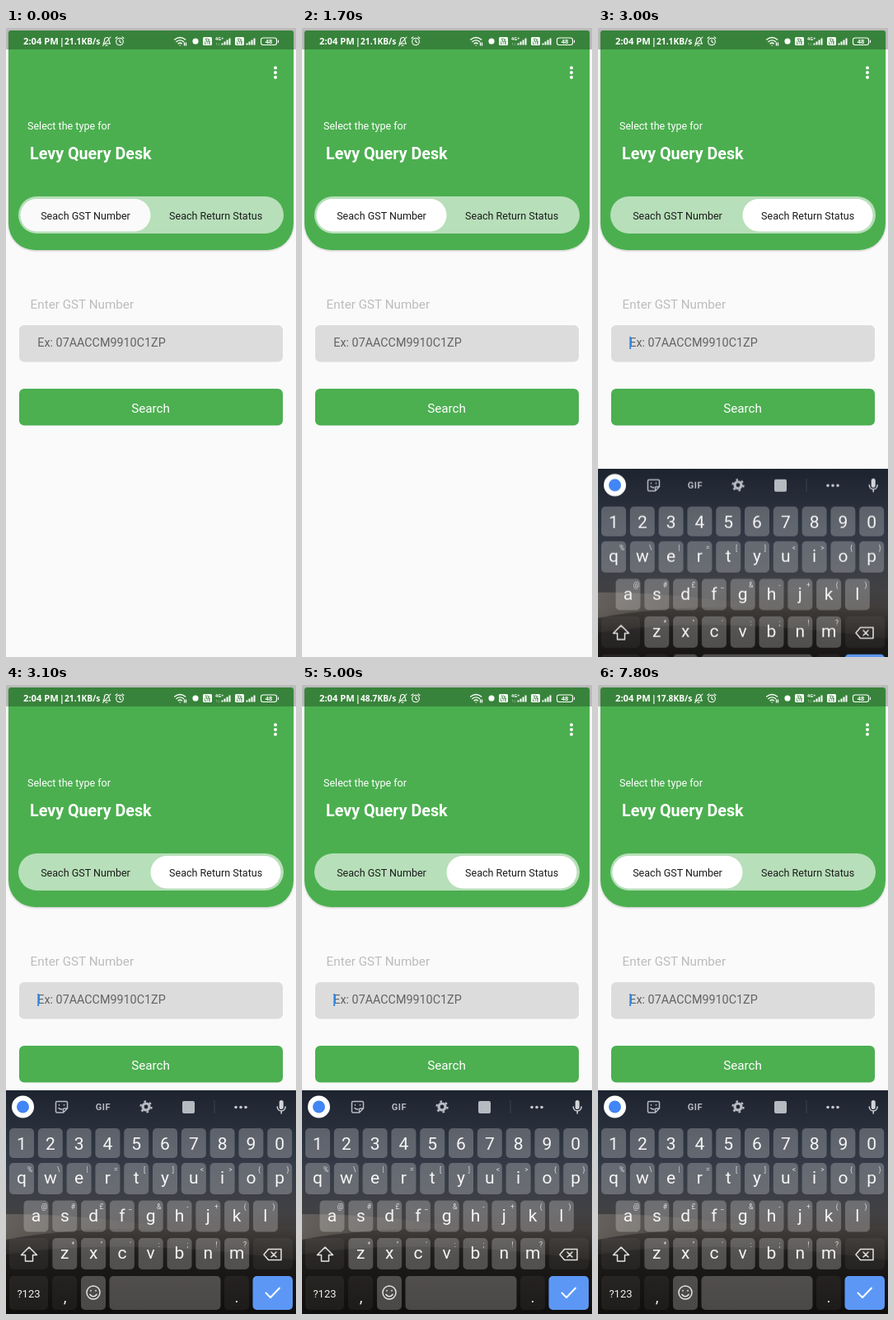
Write an HTML page that moves like this. It is 352 px wide and 762 px high and loops after 8 s.

```html
<!DOCTYPE html>
<html lang="en">
<head>
<meta charset="utf-8">
<title>Search form</title>
<style>
  html, body { margin: 0; width: 100%; height: 100%; overflow: hidden; background: #fafafa; }
  svg { display: block; width: 352px; height: 762px; font-family: Roboto, sans-serif; }
  .mid { text-anchor: middle; }
  .status { font-family: "Noto Sans", sans-serif; font-weight: 600; fill: #fff; }
  .line { fill: none; stroke-linecap: round; stroke-linejoin: round; }

  .pill, .board, .caret, .speed { animation: 8s linear infinite; }
  .pill { animation-name: slide, whiten; animation-timing-function: ease, step-end; }
  .board { animation-name: rise; }
  .caret { animation-name: blink; animation-timing-function: step-end; }
  .speed { animation-timing-function: step-end; opacity: 0; }
  .s1 { animation-name: first; }
  .s2 { animation-name: second; }
  .s3 { animation-name: third; }

  @keyframes slide {
    0%, 13.1%, 21.25%, 24.5%, 52.5%, 54.4%, 66.25%, 100% { transform: none; }
    16.25%, 18.1%, 28.2%, 49.5%, 57.5%, 63.3% { transform: translateX(158px); }
  }
  @keyframes whiten { 0% { fill: #fafafa; } 13.75%, 100% { fill: #fff; } }
  @keyframes rise {
    0%, 36.25% { transform: translateY(272px); animation-timing-function: cubic-bezier(0, 0, .2, 1); }
    38.75%, 100% { transform: none; }
  }
  @keyframes blink {
    0%, 42.5%, 53.75%, 66.25%, 78.75%, 90% { opacity: 0; }
    36.25%, 47.5%, 60%, 72.5%, 83.75%, 96.25% { opacity: 1; }
  }
  @keyframes first { 0% { opacity: 1; } 47.5%, 100% { opacity: 0; } }
  @keyframes second { 0%, 96.25% { opacity: 0; } 47.5% { opacity: 1; } }
  @keyframes third { 0% { opacity: 0; } 96.25%, 100% { opacity: 1; } }
</style>
</head>
<body>
<svg viewBox="0 0 352 762">
  <defs>
    <linearGradient id="dusk" x2="0" y2="1">
      <stop offset="0" stop-color="#1d2430"/>
      <stop offset=".34" stop-color="#343b47"/>
      <stop offset=".54" stop-color="#414144"/>
      <stop offset=".62" stop-color="#403d3b"/>
      <stop offset=".74" stop-color="#272422"/>
      <stop offset="1" stop-color="#151310"/>
    </linearGradient>
    <linearGradient id="road">
      <stop offset="0" stop-color="#8b837b" stop-opacity=".5"/>
      <stop offset="1" stop-color="#5a5451" stop-opacity="0"/>
    </linearGradient>
    <filter id="soft" x="-5%" y="-5%" width="110%" height="112%">
      <feDropShadow dx="0" dy="1" stdDeviation=".8" flood-opacity=".22"/>
    </filter>
  </defs>

  <rect width="352" height="762" fill="#fafafa"/>
  <path d="M3 6a3 3 0 0 1 3-3H346a3 3 0 0 1 3 3V237a32 32 0 0 1-32 32H35a32 32 0 0 1-32-32Z" fill="#4caf50" filter="url(#soft)"/>
  <rect width="352" height="26" opacity=".25"/>

  <g class="status">
    <text x="21" y="20.3" font-size="11.2">2:04 PM</text>
    <text x="65" y="20" font-size="10.5">|</text>
    <g font-size="10.2">
      <text class="speed s1" x="71" y="20">21.1KB/s</text>
      <text class="speed s2" x="71" y="20">48.7KB/s</text>
      <text class="speed s3" x="71" y="20">17.8KB/s</text>
    </g>
  </g>
  <g class="line" stroke="#fff" stroke-width="1.1">
    <path d="M118 19h8.5q-1.5-1.3-1.5-4.5c0-4-5.500-4-5.500 0q0 3.200-1.500 4.500M121 21.200h2M117.500 21.500l9.500-10.500"/>
    <circle cx="138" cy="16.500" r="4.300"/>
    <path d="M138 14v2.800l1.800 1M133 12.500l2-1.700M143 12.500l-2-1.700"/>
    <path d="M204.700 14q6.500-5 13 0M206.800 16.500q4.400-3.300 8.800 0M209 18.800q2.200-1.500 4.400 0" stroke-width="1.400"/>
    <path d="M211.200 21v.1M216.500 18v3M218.500 21v-3" stroke-width="1.300"/>
    <rect x="309.500" y="12" width="19" height="8.500" rx="2.500"/>
    <path d="M330.500 15v2.500"/>
  </g>
  <circle cx="230" cy="16" r="3.600" fill="#fff"/>
  <text class="status mid" x="319" y="19.100" font-size="7.500">48</text>
  <text class="status" x="254" y="14.500" font-size="5.500">4G+</text>
  <text class="status" x="254.500" y="20.500" font-size="5">↑↓</text>
  <g id="signals"></g>

  <g fill="#fff">
    <circle cx="327" cy="48.300" r="2"/><circle cx="327" cy="54" r="2"/><circle cx="327" cy="59.700" r="2"/>
    <text x="26" y="122.700" font-size="12.550">Select the type for</text>
    <text x="29" y="158.700" font-size="19.720" font-weight="700">Levy Query Desk</text>
  </g>

  <rect x="15" y="204" width="322" height="45" rx="22.500" fill="#b7dfb9"/>
  <rect class="pill" x="17.500" y="207" width="158" height="39.500" rx="19.700" fill="#fff"/>
  <g class="mid" font-size="12.550" fill="#1c1c1c">
    <text x="96.500" y="231.500">Seach GST Number</text>
    <text x="254.600" y="231.500">Seach Return Status</text>
  </g>

  <text x="29.600" y="340.400" font-size="15.240" fill="#bcbcbe">Enter GST Number</text>
  <rect x="16" y="360" width="320" height="44.500" rx="6" fill="#dcdcdc"/>
  <text x="38.300" y="386.300" font-size="14.340" fill="#636363">Ex: 07AACCM9910C1ZP</text>
  <rect class="caret" x="38.300" y="374" width="1.800" height="15" fill="#2b88e6"/>
  <rect x="16" y="437" width="320" height="44.500" rx="6" fill="#4caf50"/>
  <text class="mid" x="175.600" y="465.800" font-size="15.240" fill="#fff">Search</text>

  <g class="board">
    <rect y="491" width="352" height="271" fill="url(#dusk)"/>
    <path d="M0 641Q95 640 210 660Q90 655 0 672Z" fill="url(#road)"/>
    <path d="M0 690Q140 668 352 697V762H0Z" opacity=".25"/>
    <circle cx="20.500" cy="511" r="13.500" fill="#fff"/>
    <circle cx="20.500" cy="511" r="7.500" fill="#4285f4"/>
    <g class="line" stroke="#b6bac1" stroke-width="1.500">
      <path d="M62 504.500h11q1.500 0 1.500 1.500v7l-5 5h-7.500q-1.500 0-1.500-1.500v-10.500q0-1.500 1.500-1.500M69.500 518v-3.500q0-1.500 1.500-1.500h3.500M64.500 508.500v.5M70.500 508.500v.5M64 512.500q1.500 2 4 1.200"/>
      <circle cx="170" cy="511" r="4" stroke-width="3.200"/>
      <circle cx="170" cy="511" r="6.500" stroke-width="2.400" stroke-dasharray="2.600 4.207" stroke-linecap="butt"/>
      <path d="M329.300 511c0 6.600 9.800 6.600 9.800 0M334.200 516v3" stroke="#d3d5d9"/>
    </g>
    <rect x="331.700" y="503" width="5" height="11" rx="2.500" fill="#d3d5d9"/>
    <rect x="214" y="504" width="15" height="15" rx="2" fill="#b6bac1"/>
    <text class="mid" x="118" y="515" font-size="11" font-weight="700" fill="#b6bac1" letter-spacing=".6">GIF</text>
    <path d="M253 503v16" stroke="#fff" stroke-opacity=".13"/>
    <g fill="#c6c9ce"><circle cx="279" cy="511.500" r="1.800"/><circle cx="285" cy="511.500" r="1.800"/><circle cx="291" cy="511.500" r="1.800"/></g>

    <g id="keys"></g>
    <g fill="#fff">
      <rect x="4" y="670" width="47" height="38" rx="5" opacity=".05"/>
      <rect x="300" y="670" width="48" height="38" rx="5" opacity=".05"/>
      <rect x="4" y="716" width="47" height="41" rx="5" opacity=".06"/>
      <rect x="56" y="716" width="30" height="41" rx="5" opacity=".05"/>
      <rect x="91" y="716" width="30" height="41" rx="5" opacity=".24"/>
      <rect x="125.500" y="716" width="135" height="41" rx="5" opacity=".24"/>
      <rect x="265" y="716" width="30" height="41" rx="5" opacity=".05"/>
    </g>
    <rect x="299.500" y="716" width="48.500" height="41" rx="5" fill="#5c97f5"/>
    <g class="line" stroke="#e3e3e3" stroke-width="1.500">
      <path d="M28 681l-9.500 9.500h5v7.500h9v-7.500h5Z"/>
      <path d="M318.500 683.500h15.500v13h-15.500l-5.500-6.500ZM322 687l6 6M328 687l-6 6"/>
      <circle cx="106" cy="736" r="8"/>
      <path d="M102 738.500q4 4.500 8 0M103 733.500v.3M109 733.500v.3" stroke-width="1.700"/>
      <path d="M315.500 736.500l5.500 5.500 11-11.500" stroke="#fff" stroke-width="2"/>
    </g>
    <g class="mid" fill="#eee">
      <text x="27.500" y="741.500" font-size="13">?123</text>
      <text x="71.500" y="748" font-size="19">,</text>
      <text x="280" y="748" font-size="19">.</text>
    </g>
  </g>
</svg>
<script>
  const fill = (id, html) => document.getElementById(id).innerHTML = html;

  const bars = x => [0, 1, 2, 3].map(i =>
    `<rect x="${x + i * 3}" y="${18.500 - i * 2}" width="2" height="${2 + i * 2}" fill="#fff"/>`).join("");
  const badge = x => `<rect x="${x}" y="11" width="11" height="10" rx="1.500" fill="#fff"/>
    <g class="mid" font-size="4.600" font-weight="700" fill="#3a853d">
      <text x="${x + 5.500}" y="15.600">Vo</text><text x="${x + 5.500}" y="20">LTE</text></g>`;
  fill("signals", badge(239) + bars(261.500) + badge(278) + bars(291.500));

  const pitch = 34.800;
  const rows = [
    { keys: "1234567890", hints: "", x: 19, y: 537, h: 36, size: 21 },
    { keys: "qwertyuiop", hints: "%\\|=[]<>{}", x: 19, y: 579, h: 38, size: 21 },
    { keys: "asdfghjkl", hints: "@#£_&-+()", x: 36.500, y: 624.500, h: 38, size: 21 },
    { keys: "zxcvbnm", hints: "*\"':;!?", x: 71.300, y: 670, h: 38, size: 21 }
  ];
  const safe = c => c === "<" ? "&lt;" : c === "&" ? "&amp;" : c;
  const key = (r, c, i) => {
    const x = r.x + i * pitch, y = r.y;
    const base = y + r.h / 2 + (r.hints ? 6 : 7.500);
    return `<rect x="${x - 15}" y="${y}" width="30" height="${r.h}" rx="5" fill="#fff" opacity=".24"/>
      <text x="${x}" y="${base}" font-size="${r.size}">${c}</text>
      <text x="${x + 10}" y="${y + 10.500}" font-size="8.500" fill="#dcdcdc">${safe(r.hints[i] || "")}</text>`;
  };
  fill("keys", `<g class="mid" fill="#f5f5f5">${
    rows.map(r => [...r.keys].map((c, i) => key(r, c, i)).join("")).join("")}</g>`);
</script>
</body>
</html>
```
